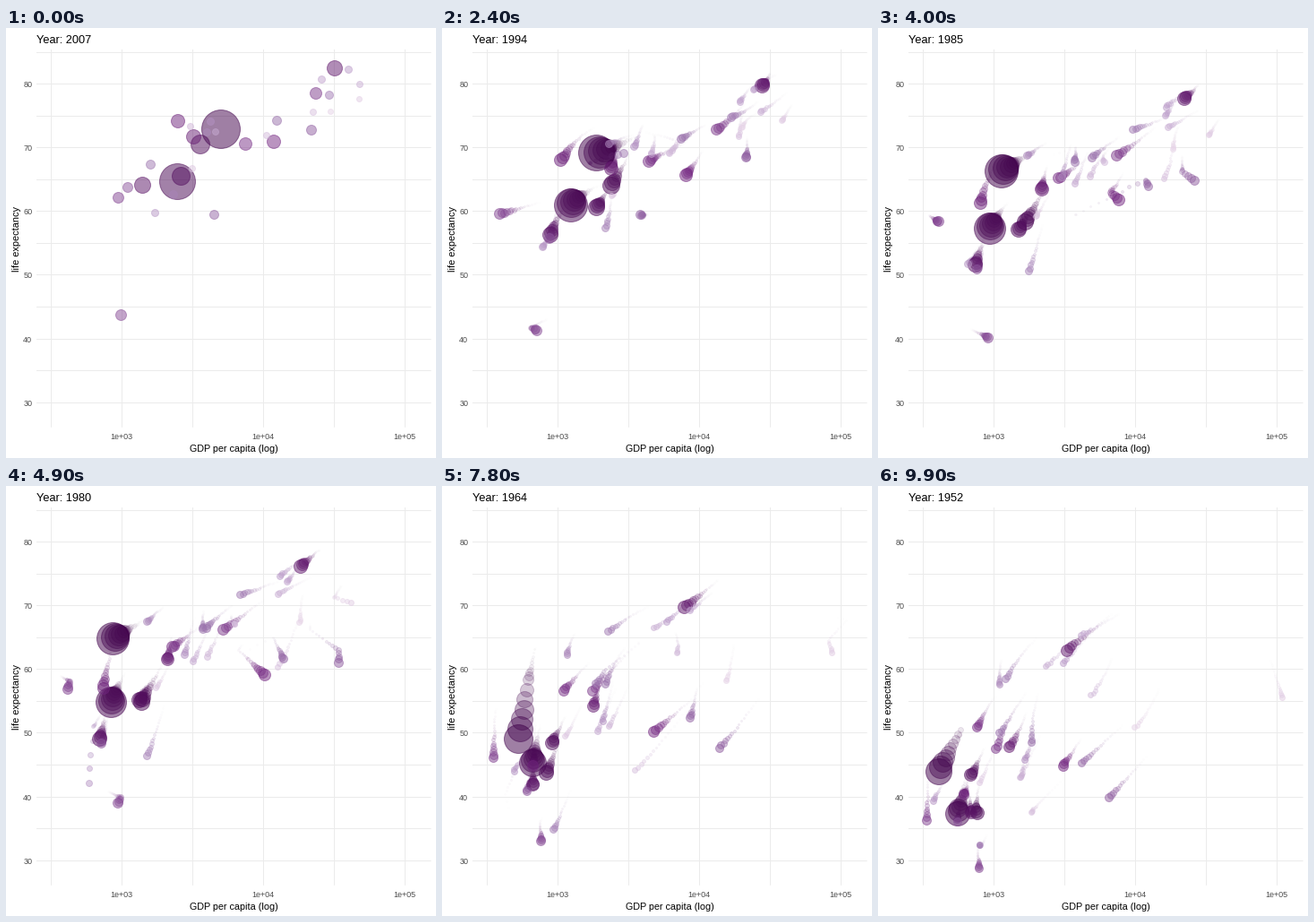
Animation of 480x480 px, one loop 10000 ms. Source, as a matplotlib script:

```python
import numpy as np
import matplotlib.pyplot as plt
from matplotlib.animation import FuncAnimation
from matplotlib.collections import EllipseCollection
from matplotlib.colors import to_rgb

FRAMES, WAKE = 100, 20
FIRST, LAST = 1952, 2007
DPI = 80
PX = 72 / DPI
LEFT, TOP, RIGHT, BOTTOM = 34, 25, 474.5, 445.8

plt.rcParams["font.family"] = "Liberation Sans"
years = np.linspace(LAST, FIRST, FRAMES)
tracks = []


def x_at(gdp):
    return LEFT + 157.95 * (np.log10(gdp) - 2.3930)


def y_at(life):
    return TOP + 7.11 * (85.293 - np.asarray(life))


def arc(*points):
    """Smooth path through (gdp, life) points evenly spaced in time."""
    gdp, life = np.array(points).T
    knots = np.linspace(0, 1, len(points))
    u = (years - FIRST) / (LAST - FIRST)
    tracks.append([np.polyval(np.polyfit(knots, v, len(points) - 1), u)
                   for v in (x_at(gdp), y_at(life))])


def turns(*points):
    """Straight runs between (year, gdp, life) points."""
    year, gdp, life = np.array(points).T
    tracks.append([np.interp(years, year, v) for v in (x_at(gdp), y_at(life))])


# From the most to the least populous
turns((1952, 400, 44), (1957, 576, 50.5), (1962, 488, 44.5), (1967, 613, 58.4),
      (1972, 677, 63.1), (1977, 741, 64), (1992, 1656, 68.7), (2007, 4959, 73))
arc((547, 37.4), (716, 49.5), (1025, 59.1), (2452, 64.7))
arc((750, 37.5), (980, 48.1), (1940, 61), (3541, 70.6))
arc((685, 43.4), (1305, 55.1), (2606, 65.5))
arc((684, 37.5), (660, 44.7), (781, 53.7), (1391, 64.1))
arc((3217, 63), (8900, 70.8), (17900, 76.2), (27300, 79.7), (31656, 82.6))
arc((1273, 47.8), (1930, 57.5), (2220, 65), (3190, 71.7))
arc((605, 40.4), (679, 49.4), (877, 64.4), (2442, 74.2))
turns((1952, 3035, 44.9), (1962, 4187, 49.3), (1977, 11889, 57.7),
      (1987, 6643, 63), (2007, 11606, 71))
arc((758, 50.9), (1440, 59.7), (3450, 66.5), (7458, 70.6))
arc((1031, 47.5), (2650, 61), (9600, 70.6), (23348, 78.6))
turns((1952, 331, 36.3), (1972, 357, 53.1), (1982, 424, 58.1),
      (1992, 347, 59.3), (2007, 944, 62.1))
turns((1952, 779, 28.8), (1972, 740, 36.1), (1982, 978, 39.9),
      (1997, 635, 41.8), (2007, 975, 43.8))
arc((546, 36.2), (706, 48.2), (1091, 63.8))
turns((1952, 6460, 39.9), (1967, 16903, 49.9), (1977, 34168, 58.7),
      (1982, 33693, 63), (1987, 21198, 66.3), (2007, 21655, 72.8))
turns((1952, 4130, 45.3), (1962, 8342, 51.5), (1972, 9576, 57), (1977, 14688, 60.4),
      (1987, 11643, 65), (1992, 3746, 59.5), (2007, 4471, 59.5))
arc((1831, 48.5), (2640, 61.8), (5860, 69.9), (12452, 74.2))
turns((1952, 1088, 50), (1967, 2144, 60), (1972, 3702, 64),
      (1992, 3726, 70), (1997, 1691, 67.7), (2007, 1593, 67.3))
arc((1207, 58.5), (3520, 68.8), (12300, 73.7), (28718, 78.4))
arc((782, 32.5), (1113, 38.9), (1940, 53.8), (2281, 62.7))
arc((1084, 57.6), (1490, 67.4), (3970, 72.4))
arc((1643, 45.9), (2316, 56.1), (3190, 67.7), (4185, 74.1))
turns((1952, 368, 39.4), (1967, 523, 45.4), (1972, 422, 40.3), (1977, 525, 31.2),
      (1982, 624, 51), (2002, 896, 56.8), (2007, 1714, 59.7))
arc((3054, 61), (12760, 74.5), (39725, 82.2))
arc((4087, 65.4), (11100, 71.3), (17400, 76), (25523, 80.7))
arc((1547, 43), (2303, 54.9), (4080, 66.6), (4519, 72.5))
arc((2315, 60.4), (7170, 69), (20640, 74.3), (47143, 80))
turns((1952, 1516, 43), (1987, 5107, 67), (1997, 7111, 71), (2007, 3025, 73.4))
arc((4835, 55.9), (6900, 64.9), (5850, 68.4), (10461, 72))
arc((1828, 37.6), (4190, 46), (12390, 60), (18850, 71.5), (22316, 75.6))
arc((787, 42.2), (1354, 52.9), (2150, 60.6), (3096, 66.8))
turns((1952, 108382, 55.6), (1967, 80895, 64.6), (1972, 109348, 67.7),
      (1982, 31354, 71.3), (2007, 47307, 77.6))
arc((9867, 50.9), (17000, 62.2), (18700, 71.4), (29796, 75.6))

X, Y = np.array(tracks).transpose(1, 2, 0)
COUNT = X.shape[1]

# Two giants, then sizes decay with rank; all shrink towards the past
rank = np.arange(COUNT)
final = 7.4 * np.exp(-(rank - 2) / 12)
final[:2] = 18, 16.5
SIZE = 2 + np.outer(np.linspace(1, 0.62, FRAMES), final)

anchors = np.array([to_rgb(c) for c in
                    ("#40004B", "#762A83", "#9970AB", "#C2A5CF", "#E7D4E8")])
ramp = np.linspace(0, 4, COUNT)
RGB = np.stack([np.interp(ramp, range(5), ch) for ch in anchors.T], axis=1)

fig = plt.figure(figsize=(6, 6), dpi=DPI, facecolor="white")
ax = fig.add_axes([0, 0, 1, 1])
ax.set_xlim(0, 480)
ax.set_ylim(480, 0)
ax.axis("off")


def label(x, y, text, px, color="black", **kw):
    return ax.text(x, y, text, fontsize=px * PX, color=color, va="baseline", **kw)


def line(xs, ys):
    ax.plot(xs, ys, color="#EBEBEB", lw=PX, solid_capstyle="butt",
            snap=False, zorder=1)


for power in np.arange(2.5, 5.1, 0.5):
    x = np.floor(x_at(10 ** power)) + 0.5
    line([x, x], [TOP - 1, BOTTOM])
    if power in (3, 4, 5):
        label(x - 1, 459, f"1e+0{power:.0f}", 9, "#4D4D4D", ha="center")
for life in range(30, 86, 5):
    y = np.floor(y_at(life)) + 0.5
    line([LEFT, RIGHT], [y, y])
    if life % 10 == 0:
        label(29.3, y + 3.5, str(life), 9, "#4D4D4D", ha="right")

label(254, 473, "GDP per capita (log)", 10.8, ha="center")
label(15, 236, "life expectancy", 11, ha="center", rotation=90,
      rotation_mode="anchor")
title = label(33.7, 17, "", 12.8)
bubbles = []


def draw(k):
    title.set_text(f"Year: {round(years[k])}")
    while bubbles:
        bubbles.pop().remove()

    # Oldest echo first, each smaller and fainter
    age = np.arange(min(k, WAKE), -1, -1)
    fade = (1 - age / (WAKE + 1)) ** 3
    font = 2.845 * SIZE[k - age] * fade[:, None] + 0.945
    d = np.maximum(np.floor(0.75 * font + 0.5), 2).ravel()
    corner = np.floor([X[k - age].ravel(), Y[k - age].ravel()]) - d // 2
    rgba = np.column_stack([np.tile(RGB, (len(age), 1)),
                            np.repeat(0.5 * fade, COUNT)])
    group = EllipseCollection(
        d, d, np.zeros_like(d), units="xy", offsets=(corner + (d + 1) / 2).T,
        offset_transform=ax.transData, facecolors=rgba, edgecolors=rgba,
        linewidths=PX, zorder=3)
    group.set_snap(False)
    ax.add_collection(group, autolim=False)
    bubbles.append(group)
    return [title, group]


anim = FuncAnimation(fig, draw, frames=FRAMES, interval=100, repeat=True)
plt.show()
```
